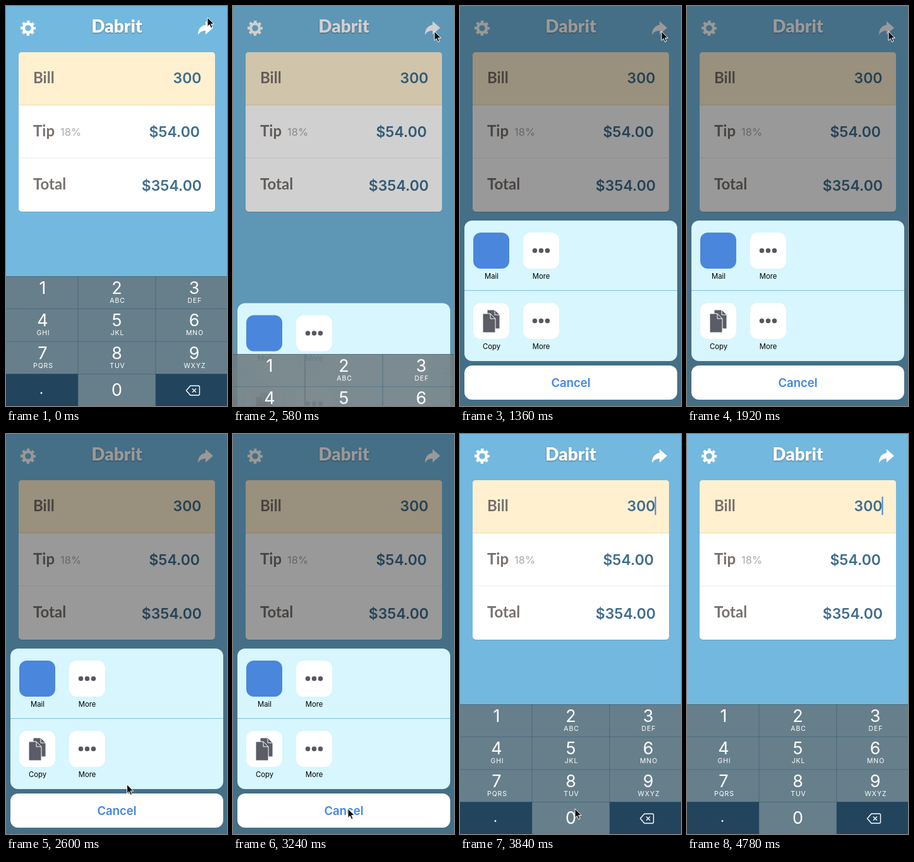
An HTML page that plays this animation: 350 px wide and 632 px high, repeating every 4.8 s.

```html
<!DOCTYPE html>
<html lang="en">
<head>
<meta charset="utf-8">
<style>
  html, body { margin: 0; width: 100%; height: 100%; overflow: hidden; }
  #stage { position: relative; width: 350px; height: 632px; overflow: hidden; background: #73b8de; }
  #stage > * { position: absolute; left: 0; top: 0; }
  svg { display: block; overflow: visible; font-family: Inter, sans-serif; }
  #dim { width: 350px; height: 632px; background: #000; }
  #keypad { top: 427px; width: 350px; height: 205px; backdrop-filter: blur(20px); }
  .name { font: 900 28px Lato, sans-serif; fill: #fff; text-anchor: middle; filter: drop-shadow(0 1px 1px #0005); }
  .label { font: 700 24px Lato, sans-serif; fill: #77706c; }
  .value { font-size: 23px; font-weight: 600; fill: #3f6d8d; text-anchor: end; }
  .caption { font-size: 11.3px; fill: #000; text-anchor: middle; }
  .digit { font-size: 27px; font-weight: 400; fill: #fff; text-anchor: middle; }
  .letters { font-size: 10.5px; letter-spacing: .9px; fill: #fff; text-anchor: middle; }
</style>
</head>
<body>
<div id="stage">
  <svg width="350" height="632">
    <g fill="none" stroke="#fff">
      <circle cx="35" cy="35" r="7" stroke-width="4.4"/>
      <circle cx="35" cy="35" r="10" stroke-width="4" stroke-dasharray="4.2 3.654" stroke-dashoffset="2.1"/>
    </g>
    <path d="M328 34.500L316 24V30C308 31 304 37 304 46C307 40.500 311 39 316 39V45Z" fill="#fff"/>
    <text class="name" x="175.500" y="42">Dabrit</text>

    <rect x="20" y="74" width="311" height="252" rx="5" fill="#0002"/>
    <rect x="20" y="73" width="311" height="252" rx="5" fill="#fff"/>
    <path d="M20 156V78a5 5 0 0 1 5-5H326a5 5 0 0 1 5 5V156Z" fill="#fff0d0"/>
    <path d="M20 156.500H331" stroke="#eedaae"/>
    <path d="M20 240H331" stroke="#ebebeb"/>
    <text class="label" x="43" y="122">Bill</text>
    <text class="label" x="43" y="206">Tip</text>
    <text class="label" x="43" y="290">Total</text>
    <text x="86" y="205" font-size="16.500" fill="#aaa">18%</text>
    <text class="value" x="309.500" y="122">300</text>
    <text class="value" x="307" y="207">$54.00</text>
    <text class="value" x="310" y="292">$354.00</text>
    <rect id="caret" x="308.500" y="99" width="2" height="29" fill="#4a82dc"/>
  </svg>

  <div id="dim"></div>

  <svg id="sheet" width="350" height="632">
    <rect x="7" y="339" width="337" height="222" rx="12" fill="#d7f6fd"/>
    <path d="M7 449.500H344" stroke="#7fbfdf"/>
    <rect x="21" y="358" width="57" height="57" rx="12" fill="#4a86dc"/>
    <g fill="#fff">
      <rect x="100" y="358" width="57" height="57" rx="12"/>
      <rect x="21" y="469" width="57" height="57" rx="12"/>
      <rect x="100" y="469" width="57" height="57" rx="12"/>
      <rect x="7" y="568" width="337" height="54" rx="12"/>
    </g>
    <path d="M118.500 386.500h0m10 0h0m10 0h0M118.500 497.500h0m10 0h0m10 0h0"
          stroke="#57585f" stroke-width="7.500" stroke-linecap="round"/>
    <g fill="#5a5c66" stroke="#fff">
      <path d="M43 480H55L63 488V510H43Z"/>
      <path d="M55 480V488H63" fill="none"/>
      <path d="M36 486H48L56 494V516H36Z"/>
      <path d="M48 486V494H56" fill="none"/>
    </g>
    <text class="caption" x="50" y="431">Mail</text>
    <text class="caption" x="128.500" y="431">More</text>
    <text class="caption" x="50" y="542">Copy</text>
    <text class="caption" x="128.500" y="542">More</text>
    <text x="175.500" y="601.500" font-size="18.500" font-weight="600" fill="#3f86e6" text-anchor="middle">Cancel</text>
  </svg>

  <div id="keypad"><svg id="keys" width="350" height="205"></svg></div>

  <svg id="pointer" width="14" height="20">
    <path d="M0 0V14.500L3.300 11.500L5.600 16.800L8 15.800L5.800 10.500H10.300Z" fill="#111" stroke="#fff" stroke-width="1"/>
  </svg>
</div>

<script>
const $ = id => document.getElementById(id);
const LOOP = 4800;

function buildKeys() {
  const letters = ['', 'ABC', 'DEF', 'GHI', 'JKL', 'MNO', 'PQRS', 'TUV', 'WXYZ'];
  const edges = [0, 114, 237, 350], centers = [58, 175.5, 298], rowHeight = 51.4;
  let out = '';
  for (let i = 0; i < 12; i++) {
    const col = i % 3, row = Math.floor(i / 3), y = row * rowHeight, x = centers[col];
    const fill = i === 9 || i === 11 ? 'rgba(15,39,60,.8)' : 'rgba(101,113,118,.8)';
    out += `<rect x="${edges[col]}" y="${y}" width="${edges[col + 1] - edges[col]}" height="${rowHeight}" fill="${fill}"/>`;
    if (i < 9) {
      out += `<text class="digit" x="${x}" y="${y + 28}">${i + 1}</text>
        <text class="letters" x="${x + 1}" y="${y + 42}">${letters[i]}</text>`;
    }
  }
  out += `<path d="M0 .5H350M0 51.500H350M0 103H350M0 154.500H350M114 0V205M237 0V205" stroke="rgba(40,80,105,.5)"/>
    <circle cx="56" cy="184.500" r="1.400" fill="#fff"/>
    <text class="digit" x="175.500" y="189">0</text>
    <path d="M285.500 180.500L292 173H304.500a2 2 0 0 1 2 2V186a2 2 0 0 1-2 2H292ZM295 177.500l6 6m0-6l-6 6"
      fill="none" stroke="#fff" stroke-width="1.400" stroke-linejoin="round"/>`;
  $('keys').innerHTML = out;
}

// Critically damped spring: 1 until it starts, settling to 0.
const spring = ms => ms <= 0 ? 1 : (1 + ms * .02) * Math.exp(-ms * .02);
const between = (t, open, close) => t < close ? 1 - spring(t - open) : spring(t - close);
const ease = (t, start, end) => {
  const k = Math.min(1, Math.max(0, (t - start) / (end - start)));
  return k * k * (3 - 2 * k);
};

function pointerAt(t) {
  const down = ease(t, 0, 320), toCancel = ease(t, 2190, 2680), leave = ease(t, 4340, 4640);
  return [319 - 137 * toCancel, 18 + 22 * down + 552 * toCancel + 60 * leave];
}

function draw() {
  const t = performance.now() % LOOP;
  const shown = between(t, 488, 3262), lowered = between(t, 480, 3284);
  $('dim').style.opacity = .4 * shown ** 1.3;
  $('sheet').style.transform = `translateY(${293 * (1 - shown)}px)`;
  $('sheet').style.visibility = shown > .002 ? 'visible' : 'hidden';
  $('keypad').style.transform = `translateY(${205 * lowered}px)`;
  $('caret').style.opacity = t > 3300 && (t < 3850 || t > 4350) ? 1 : 0;
  const [x, y] = pointerAt(t);
  $('pointer').style.transform = `translate(${x}px, ${y}px)`;
  requestAnimationFrame(draw);
}

buildKeys();
draw();
</script>
</body>
</html>
```
